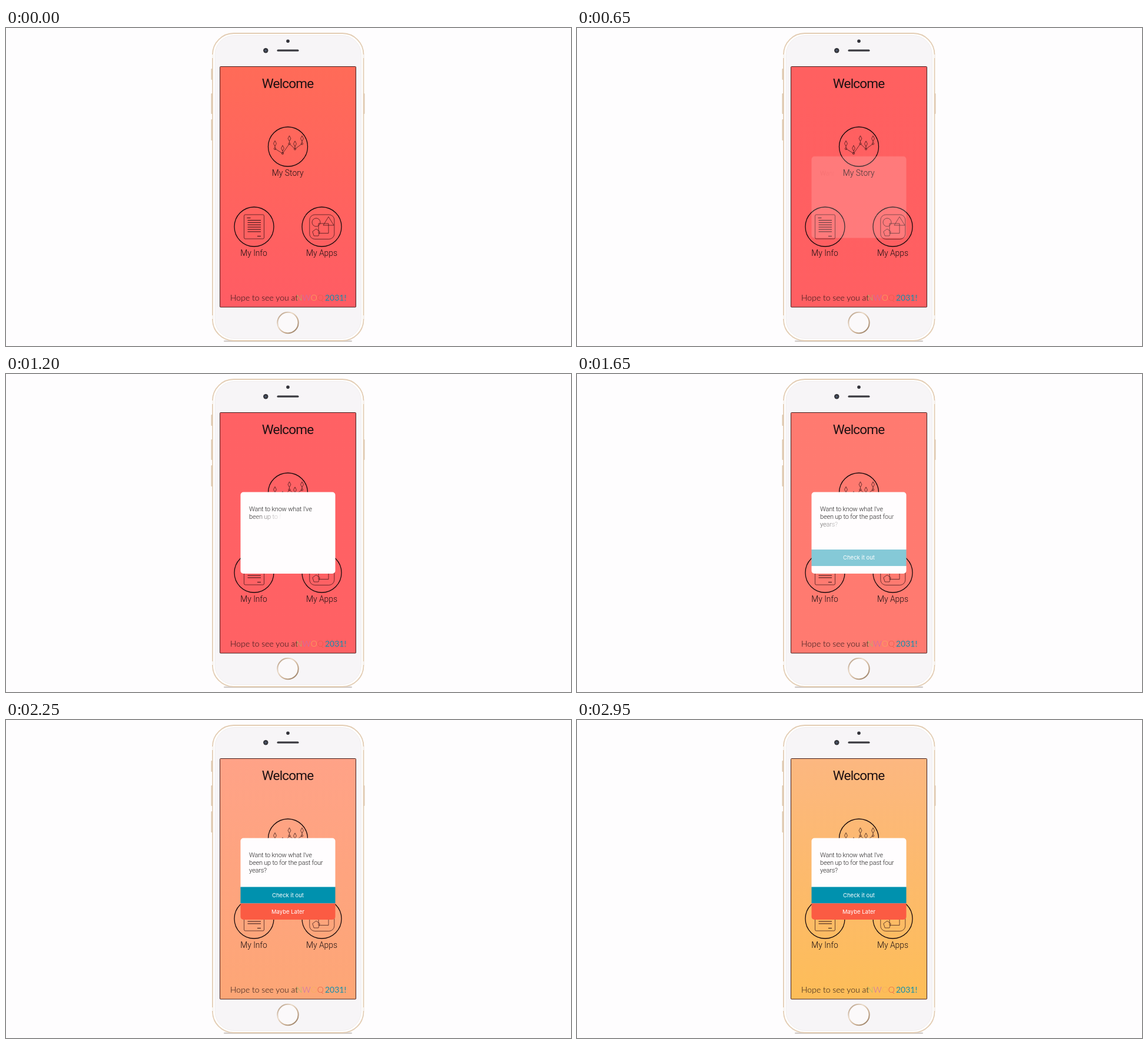
Animation of 960x540 px, one loop 3000 ms. Source, as an HTML page:

```html
<!DOCTYPE html>
<html lang="en">
<head>
<meta charset="utf-8">
<title>Welcome screen</title>
<style>
  html, body { margin: 0; width: 100%; height: 100%; overflow: hidden; background: #fefdfe; }
  svg { display: block; width: 960px; height: 540px; }
  text { font-family: Roboto, "Open Sans", sans-serif; font-weight: 300; fill: #1d1012; }
  .title { font-size: 22.5px; letter-spacing: -.8px; font-weight: 400; text-anchor: middle; }
  .label { font-size: 13.9px; text-anchor: middle; }
  .footer { font-family: Lato, sans-serif; font-size: 14px; }
  .footer .year { font-weight: 400; fill: #0f8eae; }
  .message text { font-size: 11px; letter-spacing: -.2px; fill: #222; white-space: pre; }
  .button text { font-family: Inter, "Liberation Sans", sans-serif; font-size: 9.5px; font-weight: 400; fill: #fff; text-anchor: middle; }
  .ring { fill: none; stroke: #180a0c; stroke-width: 1.3; }
  .thin { fill: none; stroke: #2b1114; stroke-width: .7; }
</style>
</head>
<body>
<svg viewBox="0 0 960 540">
  <defs>
    <linearGradient id="sky" x2="0" y2="1">
      <stop id="skyTop" stop-color="#ff6b58"/>
      <stop id="skyBottom" offset="1" stop-color="#ff5c64"/>
    </linearGradient>
    <linearGradient id="gold" x2="1" y2="1">
      <stop stop-color="#a98e74"/>
      <stop offset=".35" stop-color="#ecdccb"/>
      <stop offset=".65" stop-color="#c9ae92"/>
      <stop offset="1" stop-color="#8d735b"/>
    </linearGradient>
    <clipPath id="card"><rect x="398.5" y="200.5" width="161" height="138.5" rx="5"/></clipPath>
  </defs>

  <!-- phone -->
  <rect x="370" y="530.5" width="218" height="2.5" rx="1.2" fill="#d3cdca"/>
  <g fill="#dcc7ae">
    <rect x="348.5" y="69" width="3" height="19" rx="1"/>
    <rect x="348.5" y="111" width="3" height="35" rx="1"/>
    <rect x="348.5" y="155" width="3" height="36" rx="1"/>
    <rect x="606.5" y="111" width="3" height="35" rx="1"/>
  </g>
  <rect x="351" y="9" width="256.500" height="522" rx="36" fill="#fff" stroke="#e3cdb4" stroke-width="1.8"/>
  <rect x="355" y="12.500" width="248.500" height="515" rx="33" fill="#f7f5f7" stroke="#eeeaea" stroke-width=".8"/>
  <g fill="#f8f4f0">
    <rect x="350" y="45" width="3" height="6"/><rect x="605.500" y="45" width="3" height="6"/>
    <rect x="350" y="488" width="3" height="6"/><rect x="605.500" y="488" width="3" height="6"/>
  </g>
  <circle cx="479" cy="22.300" r="2.800" fill="#33333a"/>
  <circle cx="441.300" cy="38.200" r="4.200" fill="#34353b"/>
  <circle cx="441.300" cy="38.200" r="1.700" fill="#4d5a70"/>
  <rect x="460.500" y="36.600" width="37" height="3.200" rx="1.600" fill="#3b3b40"/>
  <circle cx="479" cy="500.500" r="17.700" fill="#fbf9fa" stroke="url(#gold)" stroke-width="2"/>

  <!-- screen -->
  <rect x="363.500" y="65.500" width="231" height="408.500" rx="1" fill="url(#sky)" stroke="#43201f"/>
  <text class="title" x="478.600" y="101.500">Welcome</text>

  <circle class="ring" cx="479" cy="201.500" r="33.500"/>
  <g class="thin" id="story"></g>
  <text class="label" x="478.700" y="251">My Story</text>

  <circle class="ring" cx="421.500" cy="337.500" r="33.500"/>
  <g class="thin">
    <rect x="404.500" y="317" width="34" height="41" rx="2"/>
    <path d="M409.500 322.500h6M410.500 326.500h22.500M410.500 330.300h22.500M410.500 334.200h22.500M410.500 338.100h22.500M410.500 342h22.500M410.500 345.900h22.500M427 353.500h6" stroke-width="1"/>
  </g>
  <text class="label" x="421" y="387">My Info</text>

  <circle class="ring" cx="536.500" cy="337.500" r="33.500"/>
  <g class="thin">
    <rect x="515.800" y="317" width="42" height="41.500" rx="9"/>
    <circle cx="527" cy="330" r="7"/>
    <path d="M548 320.500l9 14.500h-18zM531 332h17v16.500h-17z"/>
    <path d="M527 341.200l6.200 4.500-2.400 7.300h-7.600l-2.400-7.300z"/>
  </g>
  <text class="label" x="536.500" y="387">My Apps</text>

  <text class="footer" x="381" y="462.500">Hope to see you at</text>
  <text class="footer" x="493" y="462.500"><tspan fill="#a5bd68">N</tspan><tspan fill="#c26bb8">W</tspan><tspan fill="#f4b05a">O</tspan><tspan fill="#e45a45">Q</tspan></text>
  <text class="footer" x="542" y="462.500"><tspan class="year">2031!</tspan></text>

  <!-- dialog -->
  <g id="dialog" clip-path="url(#card)">
    <rect x="398" y="200" width="162" height="140" fill="#fffdfe"/>
    <g class="message" id="message"></g>
    <g class="button" id="accept">
      <rect x="398" y="283.500" width="162" height="28" fill="#0091ae"/>
      <text x="479" y="300.800">Check it out</text>
    </g>
    <g class="button" id="later">
      <rect x="398" y="311.300" width="162" height="28" fill="#fb5b43"/>
      <text x="479" y="328.600">Maybe Later</text>
    </g>
  </g>
</svg>
<script>
const LOOP = 3000;
const $ = id => document.getElementById(id);

function add(parent, tag, attrs, text = "") {
  const el = document.createElementNS("http://www.w3.org/2000/svg", tag);
  for (const key in attrs) el.setAttribute(key, attrs[key]);
  el.textContent = text;
  return parent.appendChild(el);
}

const loop = (el, frames) =>
  el.animate(frames, { duration: LOOP, iterations: Infinity });

// Goes from one state to another between two times, then holds until the loop restarts
function enter(el, start, span, from, to, easing = "ease-in-out") {
  loop(el, [
    { ...from, offset: 0 },
    { ...from, offset: start / LOOP, easing },
    { ...to, offset: (start + span) / LOOP },
    { ...to, offset: 1 }
  ]);
}

const rise = (el, start, span, dy) => enter(el, start, span,
  { opacity: 0, transform: `translate(0, ${dy}px)` },
  { opacity: 1, transform: "translate(0, 0)" });

// Story chart: joined nodes, each with a diamond on a stem
const nodes = [[457, 205], [470, 213], [481.5, 196.5], [491, 205.5], [503, 196.5]];
add($("story"), "polyline", { points: nodes.join(" ") });
for (const [x, y] of nodes) {
  add($("story"), "circle", { cx: x, cy: y, r: 1.6 });
  add($("story"), "path", { d: `M${x} ${y - 1.6}v-2.4l-2.4-4.800 2.400-4.800 2.400 4.800-2.400 4.800` });
}

// Message letters fade in one after another
let index = 0;
["Want to know what I've", "been up to for the past four", "years?"].forEach((line, row) => {
  const text = add($("message"), "text", { x: 413, y: 232.8 + row * 13.3 });
  for (const letter of line) {
    const span = add(text, "tspan", {}, letter);
    enter(span, 580 + index++ * 18.3, 220, { fillOpacity: 0 }, { fillOpacity: 1 }, "linear");
  }
});

rise($("dialog"), 480, 600, 21);
rise($("accept"), 1285, 750, 28);
rise($("later"), 1540, 740, 28);

// Background: time, top colour, bottom colour
const sky = [
  [0, "#ff6b58", "#ff5c64"],
  [650, "#ff6060", "#ff5f62"],
  [1200, "#ff6164", "#ff6164"],
  [1650, "#ff7a70", "#ff7a70"],
  [1900, "#ff8a7b", "#ff8a79"],
  [2250, "#ffa287", "#fda676"],
  [2950, "#fcb780", "#fdbd58"],
  [3000, "#fcb880", "#fdbe57"]
];
["skyTop", "skyBottom"].forEach((id, i) =>
  loop($(id), sky.map(stop => ({ offset: stop[0] / LOOP, stopColor: stop[i + 1] }))));
</script>
</body>
</html>
```
